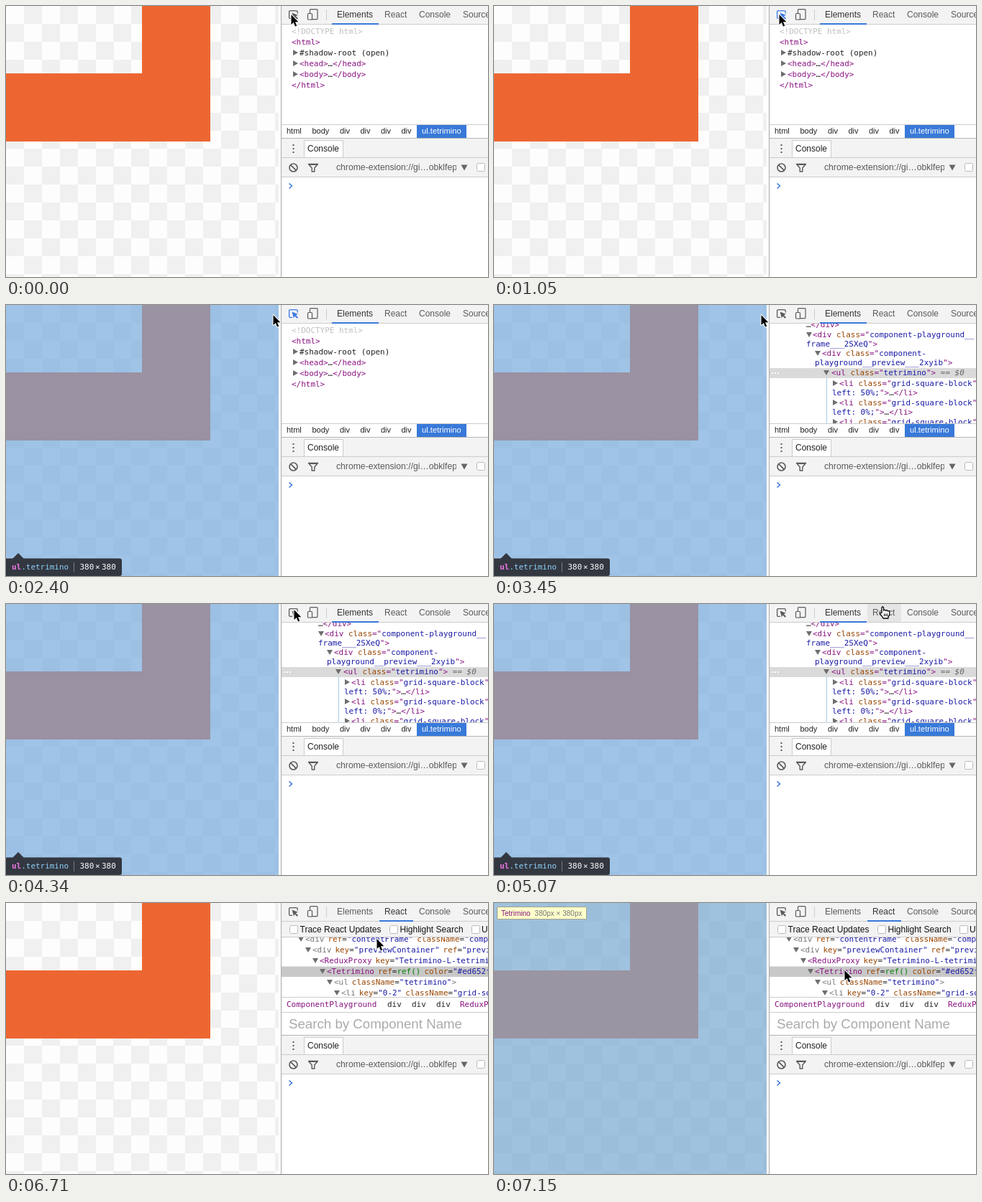
Write an HTML page with a canvas that moves like this. It is 670 by 378 pixels and loops after 8000 ms.

```html
<!DOCTYPE html>
<html lang="en">
<head>
<meta charset="utf-8">
<title>Inspecting a component</title>
<style>
  html, body { margin: 0; width: 670px; height: 378px; overflow: hidden; background: #fff; }
  canvas { display: block; width: 670px; height: 378px; }
</style>
</head>
<body>
<canvas id="stage" width="670" height="378"></canvas>
<script>
const g = document.getElementById('stage').getContext('2d');
const LOOP = 8000;
const SANS = '"Liberation Sans", Arial, sans-serif';
const MONO = '"DejaVu Sans Mono", Menlo, monospace';
const CH = 6.6;
const BAR = '#f3f3f3', LINE = '#ccc', BLUE = '#3879d9', ICON = '#5a5a5a';
const TAG = '#881280', ATTR = '#994500', VAL = '#1a1aa6', DIM = '#777', INK = '#222';

// time, x, y, shape
const pointer = [
  [0, 396, 12, arrow], [1800, 400, 13, arrow], [2250, 393, 13, arrow], [2400, 371, 14, arrow],
  [4190, 387, 11, arrow], [4340, 400, 8, arrow], [4490, 414, 7, arrow], [4630, 491, 5, arrow],
  [4780, 515, 4, arrow], [4920, 527, 1, hand], [5070, 536, 3, hand], [6560, 535, 9, arrow],
  [6710, 515, 50, arrow], [6850, 503, 66, arrow], [7000, 493, 84, arrow], [7150, 487, 94, arrow]
];

function rect(x, y, w, h, color) {
  g.fillStyle = color;
  g.fillRect(x, y, w, h);
}

function box(x, y, w, h, color, fill) {
  if (fill) rect(x, y, w, h, fill);
  g.strokeStyle = color;
  g.lineWidth = 1;
  g.strokeRect(x + .5, y + .5, w - 1, h - 1);
}

function poly(points, fill, stroke, width = 1) {
  g.beginPath();
  points.forEach(([x, y]) => g.lineTo(x, y));
  g.closePath();
  if (stroke) {
    g.strokeStyle = stroke;
    g.lineWidth = width;
    g.lineJoin = 'round';
    g.stroke();
  }
  if (fill) {
    g.fillStyle = fill;
    g.fill();
  }
}

function label(str, x, y, size = 12, color = ICON, family = SANS, style = '') {
  g.font = `${style} ${size}px ${family}`;
  g.fillStyle = color;
  g.fillText(str, x, y);
}

// Monospaced runs given as text, colour pairs; returns the end position
function code(x, y, ...runs) {
  for (let i = 0; i < runs.length; i += 2) {
    label(runs[i], x, y, 10.96, runs[i + 1], MONO);
    x += runs[i].length * CH;
  }
  return x;
}

function clip(x, y, w, h, draw) {
  g.save();
  g.beginPath();
  g.rect(x, y, w, h);
  g.clip();
  draw();
  g.restore();
}

const right = (x, y) => poly([[x, y - 4], [x + 7, y], [x, y + 4]], '#6e6e6e');
const down = (x, y) => poly([[x, y - 3], [x + 8, y - 3], [x + 4, y + 4]], '#6e6e6e');

function arrow(x, y) {
  g.save();
  g.translate(x, y);
  poly([[.5, 0], [.5, 14], [3.8, 11], [6, 16.5], [8.3, 15.5], [6, 10.3], [10.4, 10.3]], '#000', '#fff', 2);
  g.restore();
}

function hand(x, y) {
  g.save();
  g.translate(x, y);
  g.beginPath();
  g.moveTo(3, 9.5);
  g.lineTo(3, 2);
  g.quadraticCurveTo(4.2, -.5, 5.5, 2);
  g.lineTo(5.7, 6);
  g.quadraticCurveTo(7.5, 4, 8.5, 6.3);
  g.quadraticCurveTo(10.3, 4.8, 11.3, 7);
  g.quadraticCurveTo(13.6, 6, 14, 8.5);
  g.quadraticCurveTo(14, 13, 12, 15);
  g.lineTo(12, 17);
  g.lineTo(5, 17);
  g.quadraticCurveTo(3.5, 14, .8, 11.2);
  g.quadraticCurveTo(.5, 8.5, 3, 9.5);
  g.closePath();
  g.fillStyle = '#fff';
  g.fill();
  g.strokeStyle = '#000';
  g.lineWidth = 1.3;
  g.stroke();
  g.lineWidth = 1;
  for (const dx of [6.5, 8.6, 10.7]) {
    g.beginPath();
    g.moveTo(dx, 10.5);
    g.lineTo(dx, 14);
    g.stroke();
  }
  g.restore();
}

function page(tint) {
  const cell = 24.91, unit = 94.67;
  rect(0, 0, 383, 378, '#fff');
  clip(0, 0, 379, 378, () => {
    rect(0, 0, 379, 378, '#fdfdfd');
    for (let r = 0; r < 16; r++)
      for (let c = 0; c < 16; c++)
        if ((r + c) % 2) {
          const x = Math.round(c * cell), y = Math.round(r * cell);
          rect(x, y, 25, 25, '#f0f0f0');
        }
    rect(Math.round(unit * 2), 0, 95, 189, '#ed6632');
    rect(0, 94, Math.round(unit * 3), 95, '#ed6632');
    if (tint) rect(0, 0, 379, 378, tint);
  });
  rect(382, 0, 1, 378, '#a8a8a8');
}

function sizeTip() {
  const bg = '#333740';
  poly([[9, 354], [17, 346], [25, 354]], bg);
  g.fillStyle = bg;
  g.beginPath();
  g.roundRect(-3, 353.5, 164, 24.5, 3);
  g.fill();
  label('ul', 8, 369, 10.96, '#ee78e6', MONO, 'bold');
  code(8 + 2 * CH, 369, '.tetrimino', '#8ed3fb');
  rect(94, 359, 1, 14, '#777b82');
  code(102.5, 369, '380', '#fff');
  label('×', 124, 369, 10.96, '#fff', MONO);
  code(133, 369, '380', '#fff');
}

function nameTip(name) {
  g.font = `10px ${SANS}`;
  const w = g.measureText(name).width;
  box(4, 5, Math.round(w + 84), 18, '#a5a58c', '#ffffcc');
  label(name, 10, 18, 10, TAG);
  label('380px × 380px', 16 + w, 18, 10, '#777');
}

function toolbar(t) {
  rect(383, 0, 287, 25, BAR);
  rect(383, 25, 287, 1, LINE);
  const react = t >= 5820;
  if (t >= 4920 && !react) rect(519, 0, 47, 25, '#e5e5e5');

  const ink = t >= 1050 && t < 3450 ? '#3b79e8' : ICON;
  g.strokeStyle = ink;
  g.lineWidth = 1.3;
  g.beginPath();
  g.moveTo(398, 17.3);
  g.lineTo(395, 17.3);
  g.quadraticCurveTo(393.6, 17.3, 393.6, 16);
  g.lineTo(393.6, 7.8);
  g.quadraticCurveTo(393.6, 6.6, 395, 6.6);
  g.lineTo(403.8, 6.6);
  g.quadraticCurveTo(405.2, 6.6, 405.2, 8);
  g.lineTo(405.2, 10.5);
  g.stroke();
  poly([[397.5, 9.5], [406, 12.7], [402.8, 14], [406, 17.3], [404.6, 18.7], [401.4, 15.4], [400, 18.6]], ink);

  g.strokeStyle = ICON;
  g.lineWidth = 1.2;
  g.beginPath();
  g.roundRect(422.5, 4.6, 10.5, 14, 1);
  g.stroke();
  g.beginPath();
  g.roundRect(419.5, 10.5, 6, 8.5, 1);
  g.fillStyle = BAR;
  g.fill();
  g.stroke();
  rect(445, 5, 1, 15, LINE);

  label('Elements', 460, 16, 12, react ? ICON : '#333');
  label('React', 526, 16, 12, react ? '#333' : ICON);
  label('Console', 574, 16);
  label('Sources', 635, 16);
  if (!react) rect(453, 24, 65, 2, BLUE);
  else rect(t < 5970 ? 513 : 519, 24, 47, 2, BLUE);
}

function crumbs() {
  rect(383, 165, 287, 20, '#fff');
  rect(383, 165, 287, 1, LINE);
  rect(571, 166, 69, 18, BLUE);
  const names = ['html', 'body', 'div', 'div', 'div', 'div'];
  const xs = [390, 425.5, 464, 492.5, 521, 549.5];
  names.forEach((n, i) => label(n, xs[i], 178, 11, '#222'));
  label('ul.tetrimino', 578, 178, 11.2, '#fff');
}

function collapsedTree() {
  code(397, 39, '<!DOCTYPE html>', '#c0c0c0');
  code(397, 54, '<html>', TAG);
  [65, 80, 95].forEach(y => right(399, y));
  code(408, 69, '#shadow-root (open)', INK);
  code(408, 84, '<head>', TAG, '…', INK, '</head>', TAG);
  code(408, 99, '<body>', TAG, '…', INK, '</body>', TAG);
  code(397, 114, '</html>', TAG);
}

function openTree() {
  const start = (x, y, tag, value, close = '') =>
    code(x, y, '<' + tag + ' ', TAG, 'class', ATTR, '="', TAG, value, VAL, close, TAG);
  rect(383, 88, 287, 14, '#dadada');
  rect(462, 102, 1, 63, '#a9cbe8');
  code(434, 31, '…', INK, '</div>', TAG);
  down(434, 41);
  start(443, 45, 'div', 'component-playground__');
  code(434, 58, 'frame___2SXeQ', VAL, '">', TAG);
  down(446, 67);
  start(456, 71, 'div', 'component-');
  code(446, 84, 'playground__preview___2xyib', VAL, '">', TAG);
  for (let i = 0; i < 3; i++) rect(386 + i * 4, 94, 2, 2, '#fff');
  down(458, 94);
  const x = start(469, 98, 'ul', 'tetrimino', '">');
  label('== $0', x + CH, 98, 10.96, '#666', MONO, 'italic');
  ['50%', '0%', '0%'].forEach((left, i) => {
    const y = 113 + i * 27;
    right(471, y - 4);
    start(480, y, 'li', 'grid-square-block', '"');
    code(470, y + 13, `left: ${left};`, VAL, '">', TAG, '…', INK, '</li>', TAG);
  });
}

function elements(t) {
  clip(383, 26, 287, 139, t < 2550 ? collapsedTree : openTree);
  crumbs();
}

function checkbox(x, y) {
  g.beginPath();
  g.roundRect(x + .5, y + .5, 11, 11, 2);
  g.fillStyle = '#fff';
  g.fill();
  g.strokeStyle = '#bbb';
  g.lineWidth = 1;
  g.stroke();
}

function node(x, y, tag, color, attrs, close = '') {
  down(x - 10, y - 4);
  let end = code(x, y, '<', color, tag, color);
  for (const [name, value] of attrs) {
    end = value === 'ref()'
      ? code(end + 5, y, name, ATTR, '=', INK, value, '#008000')
      : code(end + 5, y, name, ATTR, '=', INK, `"${value}"`, VAL);
  }
  code(end, y, close, color);
}

function reactPanel(t) {
  rect(383, 26, 287, 22, BAR);
  rect(383, 47, 287, 1, LINE);
  checkbox(394, 31);
  label('Trace React Updates', 408.5, 41, 12, '#111');
  checkbox(533, 31);
  label('Highlight Search', 547.5, 41, 12, '#111');
  checkbox(647, 31);
  label('Use Regular Expressions', 661, 41, 12, '#111');
  clip(383, 48, 287, 83, () => {
    if (t >= 6850 && t < 7150) rect(383, t < 7000 ? 58 : 73, 287, 15, '#ebf2fb');
    rect(383, 88.5, 287, 14.5, '#c8c8c8');
    node(416, 54, 'div', DIM, [['ref', 'contentFrame'], ['className', 'component']]);
    node(426, 69, 'div', DIM, [['key', 'previewContainer'], ['ref', 'previewContainer']]);
    node(436, 84, 'ReduxProxy', TAG, [['key', 'Tetrimino-L-tetrimino']]);
    node(446, 99, 'Tetrimino', TAG, [['ref', 'ref()'], ['color', '#ed652f']]);
    node(456, 114, 'ul', DIM, [['className', 'tetrimino']], '>');
    node(466, 129, 'li', DIM, [['key', '0-2'], ['className', 'grid-square-block']]);
  });
  rect(383, 131, 287, 1, LINE);
  code(390, 145, 'ComponentPlayground', TAG);
  [530, 564, 598].forEach(x => code(x, 145, 'div', INK));
  code(631, 145, 'ReduxProxy', TAG);
  rect(383, 152, 287, 1, LINE);
  label('Search by Component Name', 393, 175, 18.7, '#aaa');
}

function drawer() {
  rect(383, 184, 287, 28, BAR);
  rect(383, 184, 287, 1, '#b5b5b5');
  [194, 199, 204].forEach(y => rect(398.5, y - 1, 2, 2, ICON));
  box(414, 187, 55, 25, LINE, '#fff');
  label('Console', 419, 203, 12, '#222');
  rect(383, 211, 287, 1, LINE);
  rect(383, 212, 287, 26, BAR);
  rect(383, 238, 287, 1, LINE);

  g.strokeStyle = ICON;
  g.lineWidth = 1.6;
  g.beginPath();
  g.arc(399.5, 225.5, 5.5, 0, Math.PI * 2);
  g.moveTo(395.6, 221.6);
  g.lineTo(403.4, 229.4);
  g.stroke();
  poly([[420.5, 220.5], [433.5, 220.5], [428.8, 226], [428.8, 231], [425.2, 231], [425.2, 226]], '', ICON, 1.4);
  rect(421, 220, 12, 2, ICON);
  clip(459, 212, 167, 26, () => label('chrome-extension://gi…obklfepj', 459, 229, 12.2));
  poly([[632.5, 221.5], [641.5, 221.5], [637, 229.5]], '#666');
  checkbox(654, 219);

  g.strokeStyle = BLUE;
  g.lineWidth = 1.6;
  g.beginPath();
  g.moveTo(393.5, 247.5);
  g.lineTo(397.5, 251);
  g.lineTo(393.5, 254.5);
  g.stroke();
}

function draw(t) {
  const picking = t >= 2400 && t < 5370, hovering = t >= 6850;
  rect(0, 0, 670, 378, '#fff');
  page(picking ? 'rgba(111,168,220,.66)' : hovering ? 'rgba(120,170,210,.7)' : '');
  if (picking) sizeTip();
  if (hovering) nameTip(t < 7000 ? 'div' : t < 7150 ? 'ReduxProxy' : 'Tetrimino');
  toolbar(t);
  if (t < 5820) elements(t);
  else reactPanel(t);
  drawer();
  const [, x, y, shape] = pointer.findLast(p => p[0] <= t);
  shape(x, y);
}

const begin = performance.now();
function tick() {
  draw((performance.now() - begin) % LOOP);
  requestAnimationFrame(tick);
}
tick();
</script>
</body>
</html>
```
